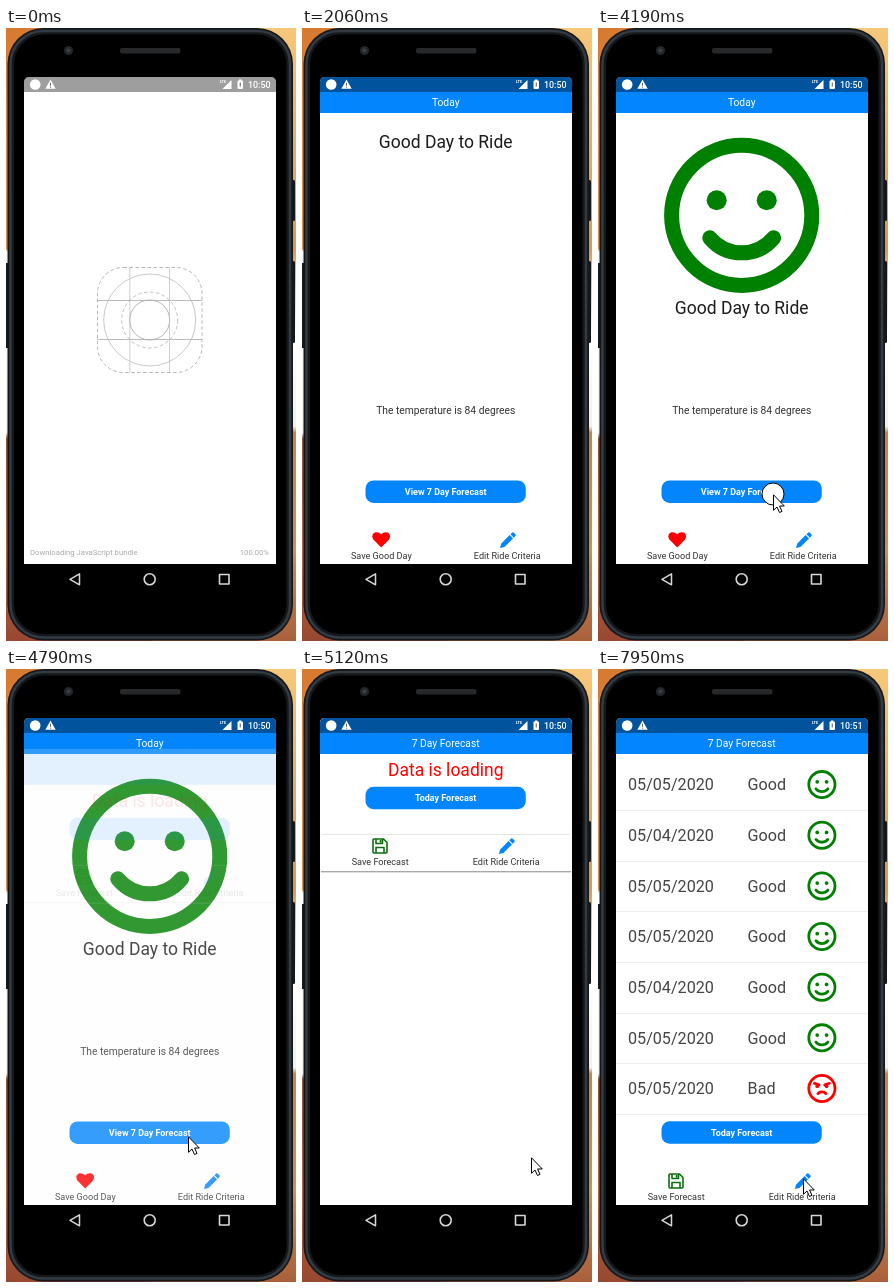
An HTML page with a canvas for the animation above (8 s loop, 290 by 613 pixels).

```html
<!DOCTYPE html>
<html lang="en">
<head>
<meta charset="utf-8">
<title>Ride forecast</title>
<style>
  html, body { margin: 0; width: 100%; height: 100%; overflow: hidden; background: #000; }
  canvas { display: block; width: 290px; height: 613px; }
</style>
</head>
<body>
<canvas></canvas>
<script>
const W = 290, H = 613, LOOP = 8000;
const BLUE = '#0386fd', MID = 143.7;
const SCREEN = [18, 49, 252, 487];
const canvas = document.querySelector('canvas');
const ctx = canvas.getContext('2d');
const ratio = window.devicePixelRatio || 1;
canvas.width = W * ratio;
canvas.height = H * ratio;

const heart = new Path2D('M9 15.5 1.6 8C-.8 5.3-.1 1.7 2.7.5 5-.4 7.3.5 9 2.5 10.7.5 13-.4 15.3.5 18.1 1.7 18.8 5.3 16.4 8Z');
const pencil = new Path2D('M0 512 31 373 306 98 414 206 139 481ZM331 73 385 19Q405-5 430 16L496 82Q517 107 493 127L439 181Z');
const floppy = new Path2D('M1 2Q1 1 2 1H11.5L15 4.5V14Q15 15 14 15H2Q1 15 1 14ZM4 1V5.500H10.500V1M8.500 2V4.500M4 15V9.500H12V15');
const smileMouth = new Path2D('M-102 72c25.4 30.5 61.9 48 102 48s76.6-17.5 102-48');
const frownMouth = new Path2D('M-68 88C-35 46 35 46 68 88');
const brows = new Path2D('M-128-88-48-64M128-88 48-64');
const arrow = new Path2D('M.5.8V16.3L4 13 6.5 18.500 9 17.400 6.600 12H11.300Z');

// Drawing helpers

function at(x, y, scale, draw) {
  ctx.save();
  ctx.translate(x, y);
  ctx.scale(scale, scale);
  draw();
  ctx.restore();
}

function rect(x, y, w, h, color) {
  ctx.fillStyle = color;
  ctx.fillRect(x, y, w, h);
}

function round(x, y, w, h, r) {
  ctx.beginPath();
  ctx.roundRect(x, y, w, h, r);
}

function circle(x, y, r) {
  ctx.beginPath();
  ctx.arc(x, y, r, 0, Math.PI * 2);
}

function fill(color, path) {
  ctx.fillStyle = color;
  path ? ctx.fill(path) : ctx.fill();
}

function stroke(color, width, path) {
  ctx.strokeStyle = color;
  ctx.lineWidth = width;
  path ? ctx.stroke(path) : ctx.stroke();
}

function verticalGradient(stops) {
  const gradient = ctx.createLinearGradient(0, 0, 0, H);
  stops.forEach(stop => gradient.addColorStop(...stop));
  return gradient;
}

// y is the middle of the capital letters
function text(string, x, y, size, color, align = 'center', weight = 400) {
  ctx.font = `${weight} ${size}px Roboto, sans-serif`;
  ctx.textAlign = align;
  ctx.fillStyle = color;
  ctx.fillText(string, x, y + size * 0.356);
}

// Position at time t along [time, x, y] points
function along(points, t) {
  let i = 0;
  while (i < points.length - 2 && t >= points[i + 1][0]) i++;
  const [t0, x0, y0] = points[i], [t1, x1, y1] = points[i + 1];
  const u = Math.min(1, (t - t0) / (t1 - t0));
  return [x0 + (x1 - x0) * u, y0 + (y1 - y0) * u];
}

// Parts of the app

function face(x, y, radius, happy) {
  const color = happy ? '#008000' : '#ff0000';
  at(x, y, radius / 248, () => {
    ctx.lineCap = 'round';
    circle(0, 0, 224);
    stroke(color, 48);
    for (const side of [-80, 80]) {
      circle(side, happy ? -48 : -40, 32);
      fill(color);
    }
    stroke(color, 48, happy ? smileMouth : frownMouth);
    if (!happy) stroke(color, 48, brows);
  });
}

function header(title) {
  rect(18, 49, 252, 36, BLUE);
  text(title, MID, 74.5, 10.27, '#fff');
}

function button(label, y) {
  round(63.5, y - 11.2, 160.3, 22.4, 8);
  fill(BLUE);
  text(label, MID, y, 8.98, '#fff', 'center', 700);
}

function footer(label, y, center, drawIcon, icons = true) {
  if (icons) {
    drawIcon(y - 24);
    at(center + 118.8, y - 24, 16 / 512, () => fill(BLUE, pencil));
  }
  text(label, center, y, 9.1, '#333');
  text('Edit Ride Criteria', center + 126, y, 9.1, '#333');
}

function today(t) {
  rect(...SCREEN, '#fff');
  header('Today');
  const ready = t >= 2060, smiling = t >= 2150;
  if (smiling) face(MID, 187.3, 77.6, true);
  if (ready) {
    text('Good Day to Ride', MID, smiling ? 280 : 113.3, 17.5, '#1c1c1c');
    text('The temperature is 84 degrees', MID, 382.7, 10.27, '#333');
  } else {
    text('Data is loading', MID, 113.3, 17.5, '#f00');
  }
  button('View 7 Day Forecast', 463.7);
  footer('Save Good Day', t >= 1260 ? 528 : 525, 79.3,
    y => at(70.2, y, 1, () => fill('#f00', heart)), t >= 1310);
}

function saveIcon(y) {
  at(70, y, 1, () => stroke('#0a6f0a', 1.6, floppy));
}

function loadingForecast() {
  rect(...SCREEN, '#f2f2f2');
  rect(...SCREEN, '#fff');
  header('7 Day Forecast');
  text('Data is loading', MID, 101, 17.5, '#f00');
  button('Today Forecast', 129);
  rect(20, 165, 248, 1, '#e4e4e4');
  rect(19, 202, 250, 1, '#a8a8a8');
  rect(19, 203, 250, 1, '#dedede');
  footer('Save Forecast', 193, 78.2, saveIcon);
}

function forecast(t) {
  rect(...SCREEN, '#fff');
  header('7 Day Forecast');
  for (let row = 0; row < 7; row++) {
    const y = 115.6 + row * 50.65;
    const good = row < 6 || t < 6420;
    text(row === 1 || row === 4 ? '05/04/2020' : '05/05/2020', 30, y, 16.15, '#444', 'left');
    text(good ? 'Good' : 'Bad', 149.6, y, 16.15, '#444', 'left');
    face(223.9, y, 14.5, good);
    rect(18, Math.round(y + 25.4), 252, 1, '#eee');
  }
  button('Today Forecast', 463.5);
  footer('Save Forecast', 528, 78.2, saveIcon);
}

function splash(t) {
  rect(...SCREEN, '#fff');
  if (t >= 600) return;
  ctx.save();
  ctx.globalAlpha = t < 500 ? 1 : 0.5;
  ctx.setLineDash([3.5, 2.5]);
  round(91.5, 239.5, 104.5, 105, 26);
  stroke('#a4a4a4', 0.8);
  circle(MID, 292, 28);
  stroke('#a4a4a4', 0.7);
  ctx.setLineDash([]);
  for (const r of [46, 20]) {
    circle(MID, 292, r);
    stroke('#a4a4a4', r > 30 ? 0.6 : 0.8);
  }
  for (const y of [272, 311]) rect(91.5, y, 104.5, 0.8, '#aaa');
  for (const x of [123.5, 163]) rect(x, 239.5, 0.7, 105, '#bbb');
  text('Downloading JavaScript bundle', 24, 524.3, 7.7, '#aaa', 'left');
  text('100.00%', 263, 524.3, 7.7, '#aaa', 'right');
  ctx.restore();
}

// Card slides up by 8 % of the screen while each of its layers fades in
function openForecast(t) {
  today(t);
  const p = 1 - (1 - Math.min(1, (t - 4770) / 460)) ** 5;
  ctx.globalAlpha = p < 0.5 ? p / 2
    : p < 0.9 ? 0.25 + (p - 0.5) * 1.125
    : 0.7 + (p - 0.9) * 3;
  ctx.translate(0, 39 * (1 - p));
  loadingForecast();
}

function statusBar(t) {
  rect(18, 49, 252, 15, 'rgba(0,0,0,.38)');
  circle(29.2, 56.5, 5.3);
  fill('#fff');
  fill('#fff', new Path2D('M44.5 51.5 49.7 60.8H39.3Z'));
  rect(44, 54.8, 1, 3, '#666');
  rect(44, 58.7, 1, 1, '#666');
  text('LTE', 217, 54, 4, '#fff', 'center', 700);
  fill('#fff', new Path2D('M225.5 52V61H216.5Z'));
  round(231.5, 52.5, 5.5, 8.5, 1);
  fill('#fff');
  rect(233, 51.5, 2.5, 1.5, '#fff');
  rect(233.7, 54.5, 1.2, 4, '#777');
  text(t < 6060 ? '10:50' : '10:51', 264.5, 56.7, 8.9, '#fff', 'right', 500);
}

function phone() {
  rect(0, 0, W / 2, H, verticalGradient([[0, '#d67a30'], [.2, '#dc8c40'], [.36, '#d8924c'],
    [.365, '#fff'], [.66, '#f4efe8'], [.67, '#8f5238'], [.85, '#b8673c'], [1, '#964832']]));
  rect(W / 2, 0, W / 2, H, verticalGradient([[0, '#f6c87c'], [.12, '#f0b462'], [.36, '#d99a50'],
    [.5, '#fff'], [.65, '#f4efe8'], [.66, '#c98546'], [.85, '#d09050'], [1, '#a8603c']]));
  rect(0, 235, 3, 85, '#16191c');
  round(284, 152, 5, 41, 1.5);
  fill('#15181b');
  round(284, 233, 5, 82, 1.5);
  fill('#15181b');
  round(1.5, 0, 285.5, 612.5, 36);
  fill('#14181b');
  round(4.5, 3, 279.5, 606.5, 33);
  stroke('#333a41', 2.6);
  round(8, 6.5, 272.5, 599.5, 30);
  fill('#000');
  circle(62.5, 22.5, 4.5);
  fill('#24272b');
  circle(62.5, 22.5, 2);
  fill('#3b4148');
  round(114, 20, 60.5, 5.5, 2);
  fill('#26282a');
  ctx.lineJoin = 'round';
  stroke('#d8d8d8', 1.5, new Path2D('M73.5 545.8V556.8L64 551.3Z'));
  circle(143.7, 551.2, 5.5);
  stroke('#d8d8d8', 1.6);
  ctx.strokeRect(213.5, 546.5, 9.5, 9.5);
}

// Pointer

const enter = [[2940, 229, 604], [3200, 201, 546], [3450, 180, 504], [3730, 175, 469]];
const leave = [[4790, 182, 467], [4940, 222, 482], [5120, 229, 488]];
const toEdit = [[7530, 229, 489], [7950, 205, 509]];

function pointerAt(t) {
  if (t < 3760) return along(enter, t);
  if (t < 3910) return [175, 468];
  if (t < 4790) return [175, 466];
  if (t < 6980) return along(leave, t);
  if (t < 7570) return [229, 489];
  return along(toEdit, t);
}

function pointer(t) {
  if (t < 2940) return;
  const [x, y] = pointerAt(t).map(Math.round);
  if (t >= 4190 && t < 4330) {
    circle(x, y, 11);
    fill('#fff');
    stroke('#000', 1);
  }
  at(x, y, 1, () => {
    ctx.lineJoin = 'miter';
    fill('#fff', arrow);
    stroke('#000', 1, arrow);
  });
}

function render(t) {
  ctx.setTransform(ratio, 0, 0, ratio, 0, 0);
  phone();
  ctx.save();
  round(...SCREEN, [5, 5, 0, 0]);
  ctx.clip();
  ctx.save();
  if (t < 780) splash(t);
  else if (t < 4790) today(t);
  else if (t < 5120) openForecast(t);
  else if (t < 6060) loadingForecast();
  else forecast(t);
  ctx.restore();
  statusBar(t);
  ctx.restore();
  pointer(t);
}

function tick() {
  render(performance.now() % LOOP);
  requestAnimationFrame(tick);
}
tick();
</script>
</body>
</html>
```
